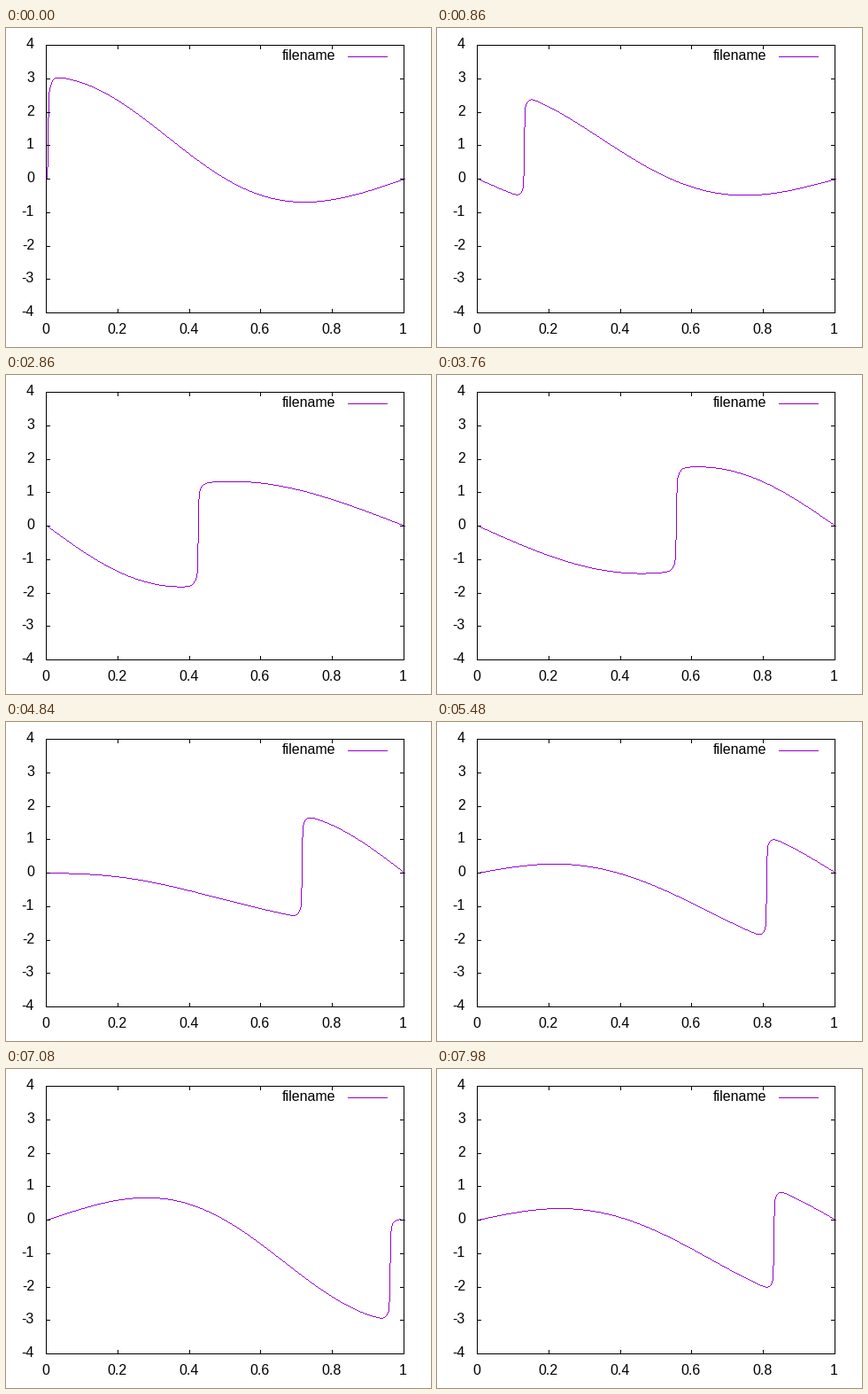
These frames come from a looping animation (480 px wide and 360 px high, 8 s). A matplotlib script:

```python
import numpy as np
import matplotlib.pyplot as plt
from matplotlib.animation import FuncAnimation

W, H = 480, 360
LEFT, RIGHT, TOP, BOTTOM = 45, 449, 19, 321
FRAMES, INTERVAL = 400, 20
START = 0.003        # shock position at time zero
STEP = 1 / 341       # tube lengths travelled per frame
CORE, TAIL = 0.0015, 0.012
MODES = (1.545, 1.455, 0.075, -0.015)
PURPLE = "#9400d3"

plt.rcParams["font.family"] = "Liberation Sans"
plt.rcParams["path.simplify"] = False

fig = plt.figure(figsize=(W / 100, H / 100), dpi=100, facecolor="white")
ax = fig.add_axes([0, 0, 1, 1])
ax.set_xlim(0, W)
ax.set_ylim(H, 0)
ax.axis("off")


def px(x):
    return LEFT + (RIGHT - LEFT) * x


def py(u):
    return (TOP + BOTTOM) / 2 - (BOTTOM - TOP) / 8 * u


def line(xs, ys, color="black"):
    """One-pixel line through whole pixels; the nudge makes snapping stable."""
    ax.plot(np.add(xs, 0.2), np.add(ys, 0.2), color=color, lw=0.72,
            antialiased=False, zorder=3)


def label(x, y, text, ha):
    ax.text(x, y, text, fontsize=16 * 0.72, ha=ha, va="baseline", zorder=4)


def shock(s):
    return 0.75 * np.tanh(s / CORE) + 0.25 * np.tanh(s / TAIL)


def wave(s):
    """Odd travelling wave of period 2 with a smoothed jump at zero."""
    s = (s + 1) % 2 - 1
    g = sum(a * np.cos((k + 0.5) * np.pi * s) for k, a in enumerate(MODES))
    return -0.5 * g * shock(s)


def pixels(x, y):
    """Walk along a polyline and give one whole pixel per step."""
    steps = np.maximum(np.abs(np.diff(x)), np.abs(np.diff(y)))
    dist = np.concatenate([[0], np.cumsum(steps)])
    walk = np.arange(0, dist[-1] + 0.5)
    return [np.floor(np.interp(walk, dist, v) + 0.5) + 0.5 for v in (x, y)]


def draw_axes():
    line([LEFT, RIGHT, RIGHT, LEFT, LEFT], [TOP, TOP, BOTTOM, BOTTOM, TOP])
    for v in range(-4, 5):
        y = np.floor(py(v) + 0.5)
        line([LEFT, LEFT + 4], [y, y])
        line([RIGHT - 4, RIGHT], [y, y])
        label(32, y + 4, str(v), "right")
    for k in range(6):
        x = np.floor(px(k / 5) + 0.5)
        line([x, x], [BOTTOM - 4, BOTTOM])
        line([x, x], [TOP, TOP + 4])
        label(x - 0.5, 345, f"{k / 5:g}", "center")


draw_axes()
label(372, 36, "filename", "right")
line([386, 430], [32, 32], PURPLE)

grid = np.linspace(0, 1, 501)
curve, = ax.plot([], [], ",", color=PURPLE, antialiased=False, zorder=2)


def update(n):
    phase = START + n * STEP
    u = wave(phase - grid) - wave(phase + grid)
    curve.set_data(*pixels(px(grid), py(u)))
    return (curve,)


anim = FuncAnimation(fig, update, frames=FRAMES, interval=INTERVAL,
                     repeat=True, repeat_delay=0)
plt.show()
```
